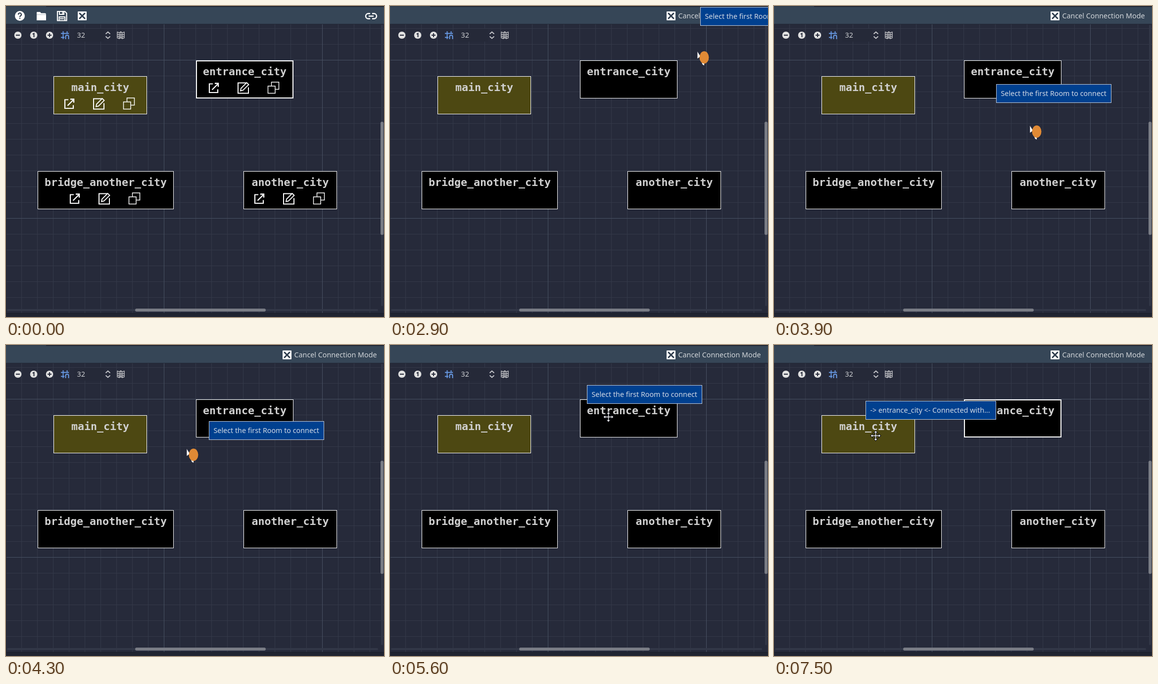
Animation of 764 by 629 pixels, one loop 8000 ms. Source, as an HTML page:

```html
<!DOCTYPE html>
<html lang="en">
<head>
<meta charset="utf-8">
<title>Room connection editor</title>
<style>
html, body { margin: 0; width: 100%; height: 100%; overflow: hidden; background: #262a3a; }
svg { display: block; width: 764px; height: 629px; }
text { font: 14.3px "Noto Sans", sans-serif; white-space: pre; }
.name { font: bold 21.6px "DejaVu Sans Mono", monospace; fill: #d0d0d0; text-anchor: middle; }
.line { fill: none; stroke: #fff; }
</style>
</head>
<body>
<svg viewBox="0 0 764 629" xmlns="http://www.w3.org/2000/svg">
  <defs>
    <g id="closeBox">
      <rect x="-9" y="-9" width="18" height="18" rx="1" fill="#fff"/>
      <path d="M-5-5L5 5M5-5L-5 5" stroke="#303e4e" stroke-width="3" stroke-linecap="round"/>
    </g>
    <g id="cardIcons" class="line">
      <path d="M-64.500-8H-71.500V9.500H-54.500V3" stroke-width="2.200"/>
      <path d="M-66 4L-54-8M-60.500-9H-53.500V-2" stroke-width="2.400"/>
      <path d="M3-10H-13.500V11H7.500V-1" stroke-width="2"/>
      <path d="M-8.500 6L-7.500 1L4-10.500L8-6.500L-3.500 5Z" stroke-width="1.800"/>
      <path d="M47-3.500H61.500V11H47Z" stroke-width="1.500"/>
      <path d="M54-4V-11.500H69V3H62" stroke-width="1.500"/>
    </g>
  </defs>

  <rect width="764" height="629" fill="#262a3a"/>
  <path id="minor" fill="none" stroke="#343949"/>
  <path id="major" fill="none" stroke="#485163"/>

  <!-- scroll bars and window edges -->
  <path d="M4 615H750M760 40V605" stroke="#323747" stroke-width="4" stroke-linecap="round"/>
  <rect x="261" y="612" width="264" height="6" rx="3" fill="#797c85"/>
  <rect x="757" y="234" width="6" height="229" rx="3" fill="#797c85"/>
  <rect y="621" width="764" height="8" fill="#202431"/>
  <path d="M0 621.500H764" stroke="#191d28"/>
  <path d="M.5 37V621" stroke="#1e2230"/>
  <rect width="764" height="37" fill="#364657"/>
  <rect width="764" height="2" fill="#202532"/>
  <rect width="81" height="2" fill="#303c4b"/>
  <path d="M0 36.500H764" stroke="#232a38"/>

  <!-- zoom bar -->
  <rect x="138" y="46" width="60" height="26" rx="2" fill="#252938"/>
  <g fill="#e0e0e0">
    <circle cx="24" cy="59" r="7.300"/><circle cx="56" cy="59" r="7.300"/><circle cx="88" cy="59" r="7.300"/>
  </g>
  <path d="M20 59H28M84 59H92M88 55V63M53.800 57L56.500 55.500V63" fill="none" stroke="#262a3a" stroke-width="2"/>
  <g fill="none" stroke="#699ce8" stroke-width="1.800">
    <path d="M111 55.500H127M115.500 51V67M123.500 51V56M111 63.500H118"/>
    <path d="M120.500 67V62A3 3 0 0 1 126.500 62V67" stroke-width="2"/>
  </g>
  <text x="143.500" y="64" fill="#cdcfd2">32</text>
  <path d="M201.500 56.500L206 52.500L210.500 56.500M201.500 61.500L206 65.500L210.500 61.500" fill="none" stroke="#c8c9cd" stroke-width="1.800"/>
  <path d="M225 52.500L229 54L232 52L235 54L239 52.500V64.500L235 66L232 64.500L229 66L225 64.500ZM229 54V66M235 54V66M232 52V65M225 57L229 58.500L235 58.500L239 57M225 61L229 62.500H235L239 61" fill="none" stroke="#d8d8da" stroke-width="1.200"/>

  <g id="tools">
    <circle cx="28" cy="20" r="10" fill="#fff"/>
    <path d="M25 17.500A3 3 0 1 1 29.500 19.800Q28 20.500 28 22.500M28 24V26" fill="none" stroke="#303e4e" stroke-width="2.200"/>
    <path d="M62 13Q62 12 63 12H69L71 14.500H79Q81 14.500 81 17V29H62Z" fill="#fff"/>
    <path d="M62 17.500H81" stroke="#b7bec6"/>
    <path d="M104 11H119L122.500 14.500V29.500H104Z" fill="none" stroke="#fff" stroke-width="2.200"/>
    <path d="M108 11V17H117V11M114.500 12V16M107.500 29V22H119V29M109 25.500H117" fill="none" stroke="#fff" stroke-width="2"/>
    <use href="#closeBox" x="154" y="20"/>
    <path id="link" d="M736 15.200H732.300A5.300 5.300 0 0 0 732.300 25.800H736M740 15.200H743.700A5.300 5.300 0 0 1 743.700 25.800H740M733 20.500H743" fill="none" stroke-width="2.400"/>
  </g>
  <g id="cancel">
    <use href="#closeBox" x="568" y="20"/>
    <text x="582.500" y="25" fill="#d2d6da">Cancel Connection Mode</text>
  </g>

  <g id="cards"></g>

  <g id="note">
    <rect x="270" y="195" width="152" height="52" fill="#000" opacity=".22"/>
    <rect x="272.500" y="196.500" width="147" height="48" fill="#e5e5e6" stroke="#f3f3f3"/>
    <text x="277" y="215" fill="#333">This is the main city.</text>
    <text x="277" y="236" fill="#333">The starting level.</text>
  </g>
  <g id="hint">
    <rect id="hintBox" x=".5" y=".5" height="37" fill="#00408f" stroke="#c3cfe0"/>
    <text id="hintText" x="9.500" y="24" fill="#d2d9e5"></text>
  </g>
  <g id="pointer">
    <path d="M0 0V16L5 12.500L10 27L14 30L15 24Z" fill="#fff" stroke="#1c2030" stroke-width=".8"/>
    <ellipse cx="14" cy="13" rx="9.500" ry="12.500" fill="#e08a35"/>
  </g>
  <path id="mover" d="M0-10.500L4-6H1.200V-1.200H6V-4L10.500 0L6 4V1.200H1.200V6H4L0 10.500L-4 6H-1.200V1.200H-6V4L-10.500 0L-6-4V-1.200H-1.200V-6H-4Z" fill="#fff" stroke="#10121a" stroke-width="1.100"/>
</svg>

<script>
const LOOP = 8000, STEP = 100;
const $ = id => document.getElementById(id);
const show = (el, on) => el.setAttribute("display", on ? "inline" : "none");
const move = (el, x, y) => el.setAttribute("transform", `translate(${x} ${y})`);

// Pointer stops: time, x, y
const path = [
  [300, 717, 56], [900, 338, 123], [1100, 338, 123], [1200, 352, 122],
  [1400, 500, 108], [1600, 672, 70], [1700, 710, 52], [1800, 724, 38],
  [2000, 731, 21], [2600, 731, 21], [2700, 690, 46], [2800, 647, 72],
  [2900, 621, 91], [3200, 465, 182], [3400, 407, 218], [3700, 407, 218],
  [3800, 469, 228], [3900, 517, 241], [4000, 522, 245], [4100, 495, 240],
  [4400, 300, 193], [4500, 262, 186], [5100, 262, 186], [5200, 290, 180],
  [5400, 395, 157], [5600, 441, 145], [6300, 441, 145], [6400, 434, 153],
  [6500, 414, 161], [6700, 310, 192], [6900, 241, 204], [7000, 243, 196],
  [7100, 249, 183], [7200, 249, 183], [7400, 205, 183]
];

const cards = [
  { name: "main_city", x: 96, y: 142, w: 189, fill: "#4d4812" },
  { name: "entrance_city", x: 384, y: 110, w: 197 },
  { name: "bridge_another_city", x: 64, y: 334, w: 275 },
  { name: "another_city", x: 480, y: 334, w: 189 }
];
const CARD_H = 77;

function pointerAt(t) {
  let i = path.findIndex(p => p[0] > t);
  if (i < 0) i = path.length;
  const a = path[Math.max(i - 1, 0)], b = path[Math.min(i, path.length - 1)];
  const k = a === b ? 0 : (t - a[0]) / (b[0] - a[0]);
  return { x: Math.round(a[1] + (b[1] - a[1]) * k), y: Math.round(a[2] + (b[2] - a[2]) * k) };
}

const inside = (p, c) => p.x >= c.x && p.x < c.x + c.w && p.y >= c.y && p.y < c.y + CARD_H;

function drawGrid() {
  const lines = { minor: "", major: "" };
  for (let i = 0; i < 24; i++)
    lines[i % 10 === 9 ? "major" : "minor"] += `M${31.5 + 32 * i} 37V621`;
  for (let i = 0; i < 18; i++)
    lines[i % 10 === 2 ? "major" : "minor"] += `M0 ${45.5 + 32 * i}H764`;
  for (const id in lines) $(id).setAttribute("d", lines[id]);
}

function drawCards() {
  $("cards").innerHTML = cards.map(c => {
    const mid = c.x + c.w / 2;
    return `<rect fill="${c.fill || "#000"}" stroke="#fff"/>
      <text class="name" x="${mid}" y="${c.y + 30}">${c.name}</text>
      <use href="#cardIcons" x="${mid}" y="${c.y + 55.5}"/>`;
  }).join("");
  const boxes = $("cards").querySelectorAll("rect");
  cards.forEach((c, i) => { c.box = boxes[i]; frameCard(c, 1); });
}

function frameCard(c, line) {
  const size = { x: c.x + line / 2, y: c.y + line / 2, width: c.w - line, height: CARD_H - line, "stroke-width": line };
  for (const key in size) c.box.setAttribute(key, size[key]);
}

function render(ms) {
  const t = Math.floor((ms % LOOP) / STEP) * STEP;
  const p = pointerAt(t), late = pointerAt(t - STEP);
  const connecting = t >= 2400, picked = t >= 6100;
  const overCard = cards.some(c => inside(p, c));

  show($("tools"), !connecting);
  show($("cancel"), connecting);
  $("cards").querySelectorAll("use").forEach(u => show(u, !connecting));
  $("link").setAttribute("stroke", t >= 2200 ? "#699ce8" : "#fff");
  frameCard(cards[1], t < 1000 || picked ? 2 : 1);

  show($("note"), t >= 5100 && t < 5200);
  show($("hint"), connecting);
  $("hintText").textContent = picked ? "-> entrance_city <- Connected with..." : "Select the first Room to connect";
  $("hintBox").setAttribute("width", picked ? 263 : 232);
  move($("hint"), late.x - 20, late.y - 70);

  show($("pointer"), t >= 300 && !overCard);
  show($("mover"), t >= 300 && overCard);
  move($("pointer"), p.x, p.y);
  move($("mover"), p.x + .5, p.y + .5);
}

drawGrid();
drawCards();
const start = performance.now();
function tick() {
  render(performance.now() - start);
  requestAnimationFrame(tick);
}
tick();
</script>
</body>
</html>
```
